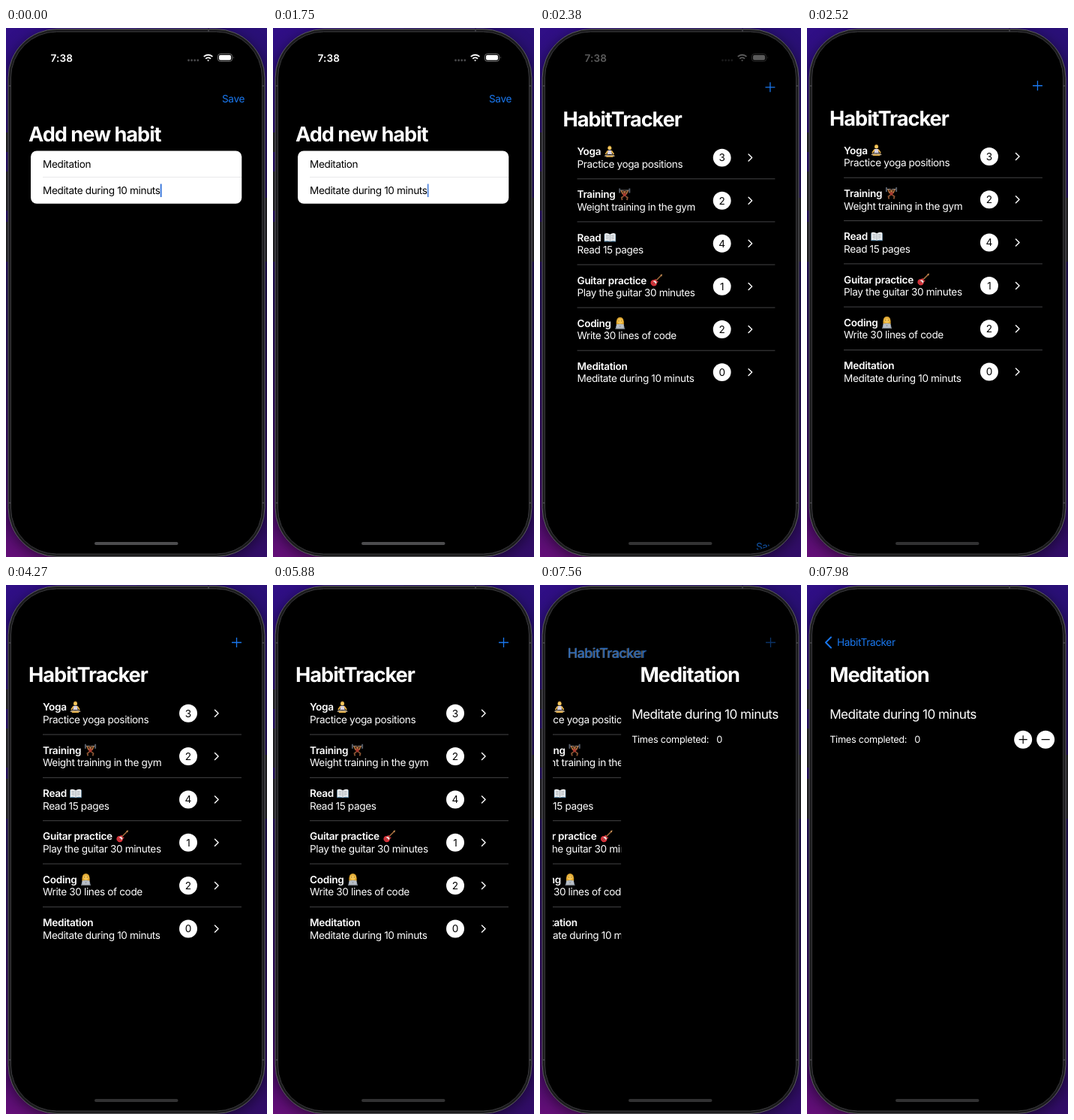
Animation, 348 px wide and 704 px high, one loop 8 s. Source, as an HTML page:

```html
<!DOCTYPE html>
<html lang="en">
<head>
<meta charset="utf-8">
<title>Habit tracker</title>
<style>
  html, body { margin: 0; width: 100%; height: 100%; overflow: hidden; background: #1c0b4a; }
  svg { display: block; width: 100vw; height: 100vh; }
  text { font: 13.6px Inter, sans-serif; letter-spacing: -.37px; font-optical-sizing: none;
         fill: #fff; white-space: pre; text-rendering: geometricPrecision; }
  .title { font-size: 27.2px; font-weight: 700; letter-spacing: -1.03px; }
  .head { font-weight: 600; letter-spacing: -.3px; }
  .clock { font-weight: 600; letter-spacing: .15px; }
  .desc { font-size: 17.2px; letter-spacing: -.56px; }
  .small { font-size: 12.8px; letter-spacing: -.31px; }
  .blue { fill: #1a78f0; }
  .dark { fill: #000; }
  .num { fill: #000; text-anchor: middle; letter-spacing: 0; }
  .line { fill: none; stroke: #fff; stroke-width: 1.4; stroke-linecap: round; stroke-linejoin: round; }
  .body { filter: drop-shadow(0 4px 9px rgba(0, 0, 0, .5)); }
</style>
</head>
<body>
<svg viewBox="0 0 348 704">
  <defs>
    <linearGradient id="wall" x2="0" y2="1">
      <stop offset="0" stop-color="#300f86"/><stop offset=".5" stop-color="#24105c"/>
      <stop offset=".85" stop-color="#3c0c6a"/><stop offset="1" stop-color="#640f78"/>
    </linearGradient>
    <linearGradient id="wallRight" x2="0" y2="1">
      <stop offset="0" stop-color="#2a1078"/><stop offset=".5" stop-color="#1f104e"/>
      <stop offset="1" stop-color="#320d68"/>
    </linearGradient>
    <clipPath id="screen"><rect x="17" y="14" width="314" height="681" rx="48"/></clipPath>
  </defs>

  <rect width="174" height="704" fill="url(#wall)"/>
  <rect x="174" width="174" height="704" fill="url(#wallRight)"/>
  <g fill="#252429">
    <rect y="139" width="4" height="26"/><rect y="191" width="4" height="52"/>
    <rect y="258" width="4" height="53"/><rect x="344" y="226" width="4" height="85"/>
  </g>
  <rect class="body" x="3" y="1.5" width="342" height="702" rx="65" fill="#1b1b1d" stroke="#5c5c60"/>
  <rect x="6.5" y="5" width="335" height="695" rx="61" fill="#000" stroke="#3a3a3d"/>
  <path d="M3 77h4M341 77h4M3 632h4M341 632h4M270 1v4" stroke="#3c3c40" stroke-width="2"/>

  <g clip-path="url(#screen)">
    <g id="card">
      <g clip-path="url(#screen)">
        <g id="list"></g>
        <g id="detail">
          <rect x="16" width="316" height="704"/>
          <text class="desc" x="30" y="178">Meditate during 10 minuts</text>
          <text class="small" x="30" y="210.3">Times completed:</text>
          <text class="small" x="143" y="210.3">0</text>
          <circle cx="288" cy="205.7" r="12" fill="#fff"/><circle cx="318" cy="205.7" r="12" fill="#fff"/>
          <path d="M282.5 205.7h11M288 200.2v11M312.5 205.7h11" stroke="#000" stroke-width="1.2"/>
        </g>
      </g>
      <text id="bigTitle" class="title">HabitTracker</text>
      <text id="backLabel" class="blue">HabitTracker</text>
      <path id="backArrow" class="line" d="M32 69.5l-7 7 7 7" style="stroke:#1a78f0;stroke-width:2"/>
      <path id="plus" d="M301 76.5h13M307.5 70v13" stroke="#1a78f0" stroke-width="1.3"/>
      <text id="detailTitle" class="title" x="30" y="129.3">Meditation</text>
    </g>

    <g id="sheet">
      <path d="M17 704V70q0-8 8-8H323q8 0 8 8V704z"/>
      <text id="save" class="blue" x="288" y="98.5">Save</text>
      <text class="title" x="30" y="151">Add new habit</text>
      <rect x="33" y="163.5" width="281.3" height="70.3" rx="8" fill="#fff"/>
      <path d="M49 198.5H314" stroke="#e4e4e6" stroke-width=".8"/>
      <text class="dark" x="49" y="186.4">Meditation</text>
      <text class="dark" x="49" y="221.4">Meditate during 10 minuts</text>
      <rect id="caret" x="205.8" y="207.5" width="1.7" height="17.5" fill="#2468d8"/>
    </g>

    <g id="status">
      <text class="clock" x="59.5" y="44.5">7:38</text>
      <g fill="#4a4a4c">
        <circle cx="243.5" cy="43" r="1.4"/><circle cx="247.6" cy="43" r="1.4"/>
        <circle cx="251.7" cy="43" r="1.4"/><circle cx="255.8" cy="43" r="1.4"/>
      </g>
      <g fill="none" stroke="#fff" stroke-width="1.9">
        <path d="M263.8 38.2a8 8 0 0 1 11.6 0M266.2 40.9a5 5 0 0 1 6.8 0"/>
        <path d="M268 42.5h3.2l-1.6 1.9z" fill="#fff" stroke="none"/>
      </g>
      <rect x="282.5" y="34.5" width="19" height="9.8" rx="3" fill="none" stroke="#777"/>
      <rect x="284" y="36" width="16" height="6.8" rx="1.8" fill="#fff"/>
      <path d="M303 37.8q1.6 1.6 0 3.2z" fill="#777"/>
    </g>
    <rect id="homeBar" x="118" y="684" width="111.5" height="4" rx="2" fill="#4c4c4e"/>
  </g>
</svg>

<script>
const $ = id => document.getElementById(id);
const LOOP = 8000, STEP = 70, PITCH = 57.35;

// Small icons, drawn around their own centre in a box of about 16 by 16.
const icons = {
  yoga: `<path d="M-2.6-3Q-3-8 0-8T2.6-3z" fill="#8a6428"/><circle cy="-4.6" r="2.4" fill="#f8c95c"/>
    <path d="M-2.4-1.8h4.8l.8 5.5h-6.4z" fill="#d9d3e2"/>
    <path d="M-2.5-1L-5.5 3.5M2.5-1L5.5 3.5" stroke="#f0b94a" stroke-width="1.7"/>
    <path d="M-7.2 6Q-6 3 0 4.5Q6 3 7.2 6Q4 7.8 0 6.6Q-4 7.8-7.2 6z" fill="#a8977f"/>
    <path d="M-4.5 6.6h9" stroke="#f0b94a" stroke-width="1.6"/>`,
  lift: `<path d="M-7-5.5H7" stroke="#999"/>
    <path d="M-6.6-8v6M6.6-8v6" stroke="#555b66" stroke-width="2"/>
    <path d="M-4.5-5.5L-2.5-1h5L4.5-5.5" stroke="#b87642" stroke-width="1.7" fill="none"/>
    <circle cy="-3.8" r="2" fill="#b87642"/><path d="M-2-4.4Q0-7.5 2-4.4z" fill="#33231c"/>
    <path d="M-2.4-1.5h4.8L1.8 2.6h-3.6z" fill="#a83a30"/>
    <path d="M-1.5 2.5L-4 4.2-3.2 7.5M1.5 2.5L4 4.2 3.2 7.5" stroke="#8a5433" stroke-width="1.8" fill="none"/>`,
  book: `<path d="M-7.8-4.2H7.8V6H-7.8z" fill="#5b86a4"/>
    <path d="M0-4Q-3.5-6.5-7.2-5V5Q-3.5 3.7 0 5.5Q3.5 3.7 7.2 5V-5Q3.5-6.5 0-4z" fill="#eef1f3"/>
    <path d="M0-4V5.4M-5.5-2.8l4 .6M-5.5-.6l4 .6M-5.5 1.6l4 .6M5.5-2.8l-4 .6M5.5-.6l-4 .6M5.5 1.6l-4 .6" stroke="#8f979f" stroke-width=".8"/>`,
  guitar: `<path d="M-2 2L6.3-6.3" stroke="#a06a3c" stroke-width="1.6"/>
    <path d="M5.2-7L8-8.2 7.2-5z" fill="#d49a5b"/>
    <path d="M-1-2Q-2.5 0-5-.5Q-8.3 1-7.4 5Q-5 8.8-1 7.3Q.8 6 .8 3.4Q3 2.5 2.5 1Q0 2-.3-.6z" fill="#d8323a"/>
    <path d="M-4.5 1L-.5 5 .5 2.5-1.5.5z" fill="#f0e4e0"/>
    <path d="M-3.6 2.2l2 2M-5.3 4l1.6 1.6" stroke="#6b3a3a" stroke-width="1"/>`,
  coder: `<path d="M-5 2Q-6-8 0-8T5 2z" fill="#d9a02c"/>
    <path d="M-6 7Q-6 .8 0 .8T6 7z" fill="#7d8ea3"/>
    <circle cy="-2.8" r="3.6" fill="#f7c653"/>
    <path d="M-4-3Q-4-7.5 0-7.5T4-3Q2.5-5.5 0-5.5T-4-3z" fill="#e0ab38"/>
    <path d="M-1.8-3h.1M1.8-3h.1" stroke="#4d3a20" stroke-linecap="round"/>
    <path d="M-5 1.5H5V7H-5z" fill="#b9bfc6"/><circle cy="4.2" r=".9" fill="#8c949d"/>
    <path d="M-6.5 7.3h13" stroke="#9fa6ae"/>`
};

const habits = [
  ['Yoga', 'Practice yoga positions', 3, 'yoga', 92.5],
  ['Training', 'Weight training in the gym', 2, 'lift', 112.5],
  ['Read', 'Read 15 pages', 4, 'book', 93],
  ['Guitar practice', 'Play the guitar 30 minutes', 1, 'guitar', 155],
  ['Coding', 'Write 30 lines of code', 2, 'coder', 106.5],
  ['Meditation', 'Meditate during 10 minuts', 0]
];

$('list').innerHTML = habits.map(([name, note, count, icon, iconX], i) => `
  <g transform="translate(0 ${i * PITCH})">
    <text class="head" x="49" y="167.4">${name}</text>
    <text x="49" y="184">${note}</text>
    ${icon ? `<g transform="translate(${iconX} 162.5)">${icons[icon]}</g>` : ''}
    <circle cx="243" cy="170.7" r="12" fill="#fff"/>
    <text class="num" x="243" y="175.6">${count}</text>
    <path class="line" d="M278.5 166.2l4.6 4.5-4.6 4.5"/>
    ${i < habits.length - 1 ? '<path d="M49 199H314" stroke="#4c4c4e" stroke-width=".9"/>' : ''}
  </g>`).join('');

const clamp = v => Math.min(1, Math.max(0, v));
const lerp = (a, b, p) => a + (b - a) * p;
const ramp = (t, from, to) => clamp((t - from) / (to - from));

// Critically damped spring: what is left of the way, from 1 down to 0.
function springLeft(t, start) {
  const x = Math.max(0, t - start) * .0183;
  return (1 + x) * Math.exp(-x);
}

function caretOpacity(t) {
  if (t >= 1960) return 0;
  return 1 - ramp(t, 70, 280) + ramp(t, 490, 630) - ramp(t, 980, 1330) + ramp(t, 1470, 1820);
}

const place = (id, transform) => $(id).setAttribute('transform', transform);
const fade = (id, opacity) => $(id).setAttribute('opacity', opacity);

function draw(t) {
  const cover = springLeft(t, 2131);
  const size = 1 - .0735 * cover;
  place('card', `translate(${174 * (1 - size)} ${45 * cover}) scale(${size})`);
  place('sheet', `translate(0 ${633 * (1 - cover)})`);
  fade('save', t < 1960 ? 1 : .7);
  fade('caret', caretOpacity(t));
  fade('status', 1 - ramp(t, 2200, 2480));
  fade('homeBar', lerp(.65, 1, cover));

  const left = springLeft(t, 7425);
  place('list', `translate(${-94 * (1 - left)} 0)`);
  place('detail', `translate(${314 * left} 0)`);

  // The navigation bar trails the page by a few milliseconds.
  const barLeft = springLeft(t, 7434), pushed = 1 - barLeft;
  place('detailTitle', `translate(${314 * barLeft} 0)`);
  fade('detailTitle', barLeft < 1 ? 1 : 0);
  const spot = `translate(${lerp(30, 40, pushed)} ${lerp(129.3, 81.3, pushed)})`;
  place('bigTitle', `${spot} scale(${lerp(1, .48, pushed)})`);
  place('backLabel', `${spot} scale(${lerp(2.08, 1, pushed)})`);
  fade('bigTitle', barLeft);
  fade('backLabel', pushed);
  fade('backArrow', ramp(pushed, .8, 1));
  fade('plus', barLeft < .01 ? 0 : Math.min(1, barLeft * 1.3));
}

function frame(now) {
  const t = now % LOOP;
  draw(Math.floor(t / STEP) * STEP);
  requestAnimationFrame(frame);
}
draw(0);
requestAnimationFrame(frame);
</script>
</body>
</html>
```
